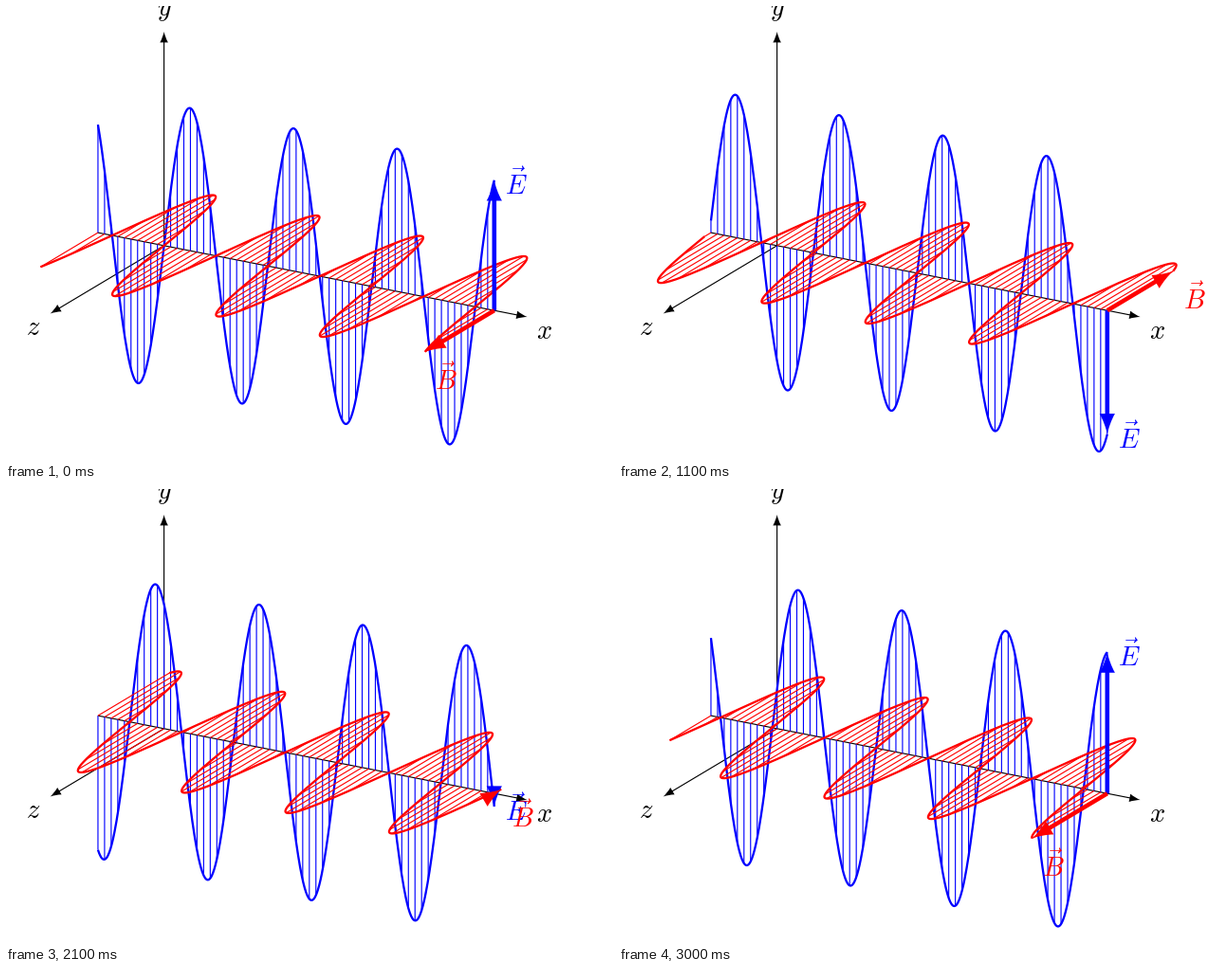
A matplotlib script that plays this animation: 640x480 px, repeating every 3100 ms.

```python
import matplotlib.pyplot as plt
import numpy as np
from matplotlib.animation import FuncAnimation
from matplotlib.collections import LineCollection
from matplotlib.patches import PathPatch
from matplotlib.path import Path

W, H, DPI = 640, 480, 100
PT = 2.85                      # pixels per drawing point
ORIGIN = np.array([166.6, 252.8])
X = np.array([17.41, 3.42])    # screen vectors of the wave axes
E_DIR = np.array([0, -150.5])
B_DIR = np.array([-80, 47.8])
FRAMES, STEP = 31, 0.2
THIN, THICK, HEAVY = 0.4 * PT, 0.8 * PT, 1.6 * PT

plt.rcParams["mathtext.fontset"] = "cm"
fig = plt.figure(figsize=(W / DPI, H / DPI), dpi=DPI, facecolor="white")
ax = fig.add_axes([0, 0, 1, 1])
ax.set_xlim(0, W)
ax.set_ylim(H, 0)
ax.axis("off")


def px(width):
    return width * 72 / DPI


def on_axis(x):
    return ORIGIN + np.outer(x, X)


def head_path(tip, direction, width):
    """Curved arrow head ending at tip; also returns where the shaft stops."""
    a = 0.28 * PT + 0.3 * width
    u = direction / np.hypot(*direction)
    n = np.array([-u[1], u[0]])
    shape = [(0, 0), (-2.667, .5), (-7, 2), (-10, 3.75),
             (-10, -3.75), (-7, -2), (-2.667, -.5), (0, 0)]
    verts = [tip + a * (s * u + t * n) for s, t in shape]
    codes = [Path.MOVETO] + [Path.CURVE4] * 3 + [Path.LINETO] + [Path.CURVE4] * 3
    return Path(verts, codes), tip - 9 * a * u


def stroke(color, width, z):
    line, = ax.plot([], [], color=color, lw=px(width), zorder=z,
                    solid_capstyle="butt", snap=False)
    return line


class Arrow:
    def __init__(self, color, width, z):
        self.width = width
        self.shaft = stroke(color, width, z)
        self.head = PathPatch(Path([(0, 0)]), fc=color, lw=0, zorder=z, snap=False)
        ax.add_patch(self.head)

    def set(self, start, vector):
        path, end = head_path(start + vector, vector, self.width)
        self.shaft.set_data(*zip(start, end))
        self.head.set_path(path)


def label(text, x, y, color="black", z=1):
    return ax.text(x, y, f"${text}$", color=color, fontsize=px(10 * PT),
                   ha="center", va="baseline", zorder=z)


class Field:
    def __init__(self, name, color, direction, offset, z):
        self.direction, self.offset = direction, np.array(offset)
        self.ribs = LineCollection([], colors=color, linewidths=px(THIN),
                                   zorder=z, snap=False)
        ax.add_collection(self.ribs)
        self.curve = stroke(color, THICK, z + .5)
        self.arrow = Arrow(color, HEAVY, z + 4)
        self.text = label(rf"\vec{{{name}}}", 0, 0, color, z + 4.5)

    def points(self, x, phase):
        return on_axis(x) + np.outer(np.sin(x - phase), self.direction)

    def update(self, phase):
        ends = self.points(RIB_X, phase)
        self.ribs.set_segments(np.stack([on_axis(RIB_X), ends], axis=1))
        self.curve.set_data(*self.points(CURVE_X, phase).T)
        base = on_axis([20])[0]
        vector = np.sin(20 - phase) * self.direction
        self.arrow.set(base, vector)
        self.text.set_position(base + vector + self.offset)


RIB_X = np.linspace(-4, 20, 61)
CURVE_X = np.linspace(-4, 20, 601)

Arrow("black", THIN, 1).set(on_axis([-4])[0], 26 * X)
Arrow("black", THIN, 1).set(ORIGIN, 1.5 * E_DIR)
Arrow("black", THIN, 1).set(ORIGIN, 1.5 * B_DIR)
label("x", 567.5, 351)
label("y", 167, 10)
label("z", 29, 347)

fields = [Field("E", "blue", E_DIR, (23, 15), 2),
          Field("B", "red", B_DIR, (22.3, 40.5), 3)]


def draw(frame):
    for field in fields:
        field.update(STEP * frame)
    return []


anim = FuncAnimation(fig, draw, frames=FRAMES, interval=100, repeat=True,
                     repeat_delay=0, blit=False)
plt.show()
```
